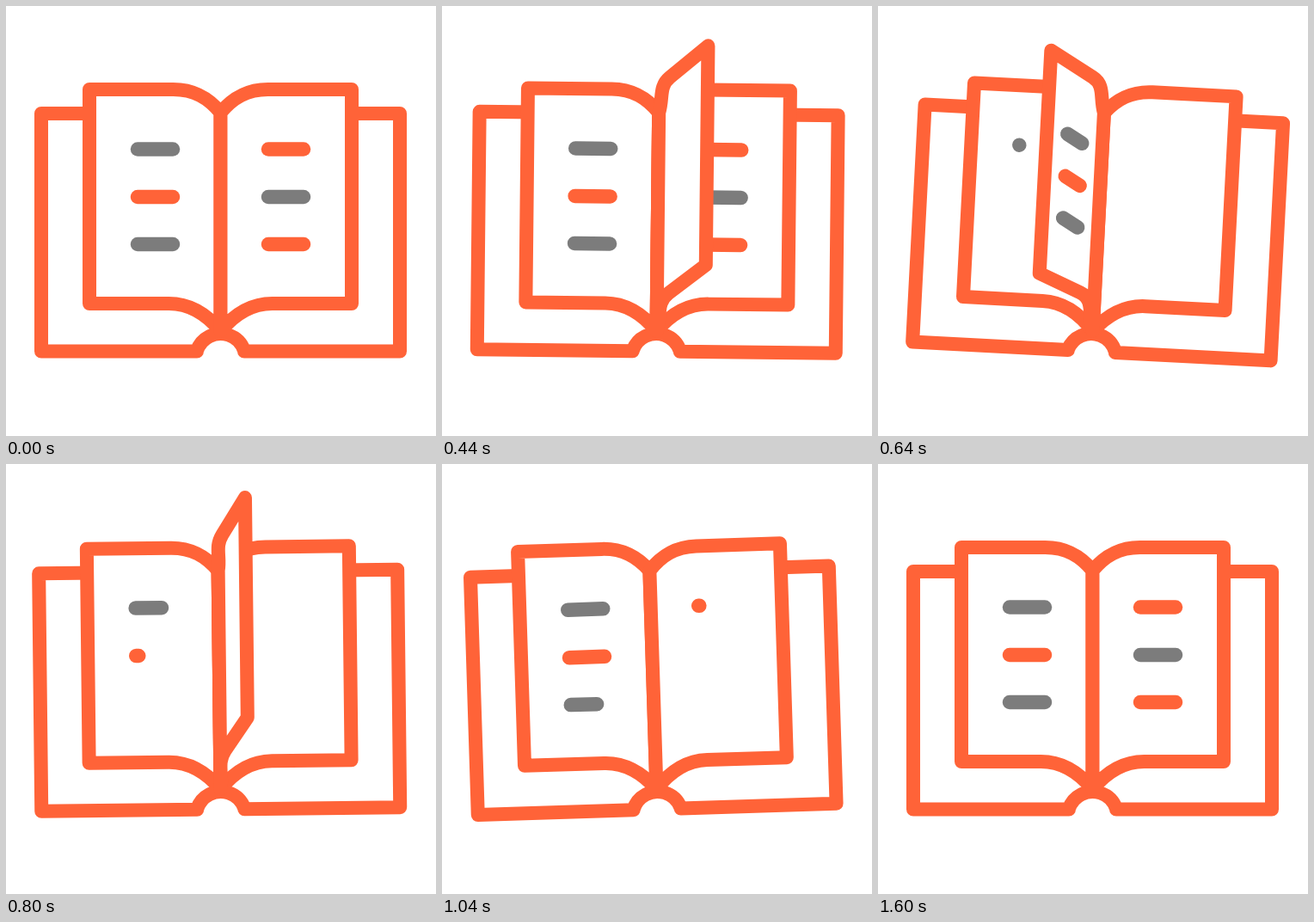
These frames come from a looping animation (500x500 px, 2 s). An HTML page with a canvas:

```html
<!DOCTYPE html>
<html lang="en">
<head>
<meta charset="utf-8">
<title>Book</title>
<style>
  html, body { margin: 0; width: 100%; height: 100%; overflow: hidden; background: #fff; }
  canvas { display: block; }
</style>
</head>
<body>
<canvas id="stage" width="500" height="500"></canvas>
<script>
const ctx = document.getElementById('stage').getContext('2d');
const ORANGE = '#ff6338', GRAY = '#7c7c7c';
const LOOP = 2000, STEP = 40;
const SPINE = 249.5, PIVOT_Y = 380, HALF = 152.5;
const FLIP_STARTS = [40, 440], FLIP_TIME = 600;
const LINE_YS = [166.5, 222, 277], LINE_TIME = 240;

const clamp = v => Math.min(1, Math.max(0, v));
const smooth = v => (v = clamp(v)) * v * (3 - 2 * v);
const flipEase = v => v * (0.49 + 1.4 * v - 0.89 * v * v);

function paint() {
  ctx.fillStyle = '#fff';
  ctx.strokeStyle = ORANGE;
  ctx.lineWidth = 16;
  ctx.fill();
  ctx.stroke();
}

function cover() {
  ctx.beginPath();
  ctx.moveTo(41, 125);
  ctx.lineTo(41, 401.5);
  ctx.lineTo(222, 401.5);
  const angle = Math.asin(27.5 / 29);
  ctx.arc(SPINE, 410, 29, -Math.PI / 2 - angle, -Math.PI / 2 + angle);
  ctx.lineTo(277, 401.5);
  ctx.lineTo(458, 401.5);
  ctx.lineTo(458, 125);
  ctx.closePath();
  paint();
}

// Page edge from outer corner to spine: straight, then curved.
function edge(corner, bend, end, u) {
  const dx = bend[0] - corner[0], dy = bend[1] - corner[1];
  const reach = 0.4 * Math.hypot(end[0] - bend[0], end[1] - bend[1]) / Math.hypot(dx, dy);
  const near = [bend[0] + dx * reach, bend[1] + dy * reach];
  const far = [end[0] + 14 * u, end[1] - 17];
  return [corner, bend, near, far, end];
}

// u runs from -1 (flat on the left) to 1 (flat on the right).
function page(u) {
  const a = Math.abs(u), left = u < 0;
  const x = SPINE + HALF * u;
  const bendX = size => SPINE + Math.sign(u) * size * a ** 1.5;
  const drop = 1 - a ** 3;
  const top = edge([x, 97 - 61 * (1 - a ** (left ? 1.4 : 1.85))],
    [bendX(55), 97 - 15 * drop], [SPINE, 124], u);
  const bottom = edge([x, 346 - 54 * (1 - a ** (left ? 1.05 : 1.85))],
    [bendX(60), 346 - 13 * drop], [SPINE, 378], u);
  ctx.beginPath();
  ctx.moveTo(...top[0]);
  ctx.lineTo(...top[1]);
  ctx.bezierCurveTo(...top[2], ...top[3], ...top[4]);
  ctx.lineTo(...bottom[4]);
  ctx.bezierCurveTo(...bottom[3], ...bottom[2], ...bottom[1]);
  ctx.lineTo(...bottom[0]);
  ctx.closePath();
  paint();
}

function bar(x1, y1, x2, y2, color) {
  ctx.beginPath();
  ctx.moveTo(x1, y1);
  ctx.lineTo(x2 + 0.01, y2);
  ctx.strokeStyle = color;
  ctx.lineWidth = 16.5;
  ctx.stroke();
}

const lineColor = (side, i) => (side + i) % 2 ? ORANGE : GRAY;

function textLines(side, t, full, first, gap) {
  const x = side ? 305 : 153;
  LINE_YS.forEach((y, i) => {
    const start = first + gap * i;
    if (!full && t < start) return;
    const grown = full ? 1 : smooth((t - start) / LINE_TIME);
    bar(x, y, x + 41 * grown, y, lineColor(side, i));
  });
}

function turningLines(u) {
  const k = 1 + u;
  LINE_YS.forEach((y, i) => {
    const at = d => [SPINE - d * u, 222 - 30 * k + (y - 222) * (1 - 0.2 * k) + 0.43 * k * (d + 76)];
    bar(...at(-96.5), ...at(-55.5), lineColor(0, i));
  });
}

function tilt(t) {
  const span = 280;
  return 3 * smooth((t - 360) / span) - 6 * smooth((t - 640) / span) + 3 * smooth((t - 920) / span);
}

function draw(t) {
  ctx.setTransform(1, 0, 0, 1, 0, 0);
  ctx.fillStyle = '#fff';
  ctx.fillRect(0, 0, 500, 500);
  ctx.lineCap = ctx.lineJoin = 'round';
  ctx.translate(SPINE, PIVOT_Y);
  ctx.rotate(tilt(t) * Math.PI / 180);
  ctx.translate(-SPINE, -PIVOT_Y);

  cover();
  page(-1);
  page(1);
  textLines(0, t, t <= FLIP_STARTS[1], 640, 120);
  textLines(1, t, t < FLIP_STARTS[0] + FLIP_TIME, 1016, 160);

  for (const start of FLIP_STARTS) {
    const v = (t - start) / FLIP_TIME;
    if (v <= 0 || v >= 1) continue;
    const u = 2 * flipEase(v) - 1;
    page(u);
    if (u < -0.35) turningLines(u);
  }
}

function frame(now) {
  draw(Math.floor(now % LOOP / STEP) * STEP);
  requestAnimationFrame(frame);
}
frame(performance.now());
</script>
</body>
</html>
```
